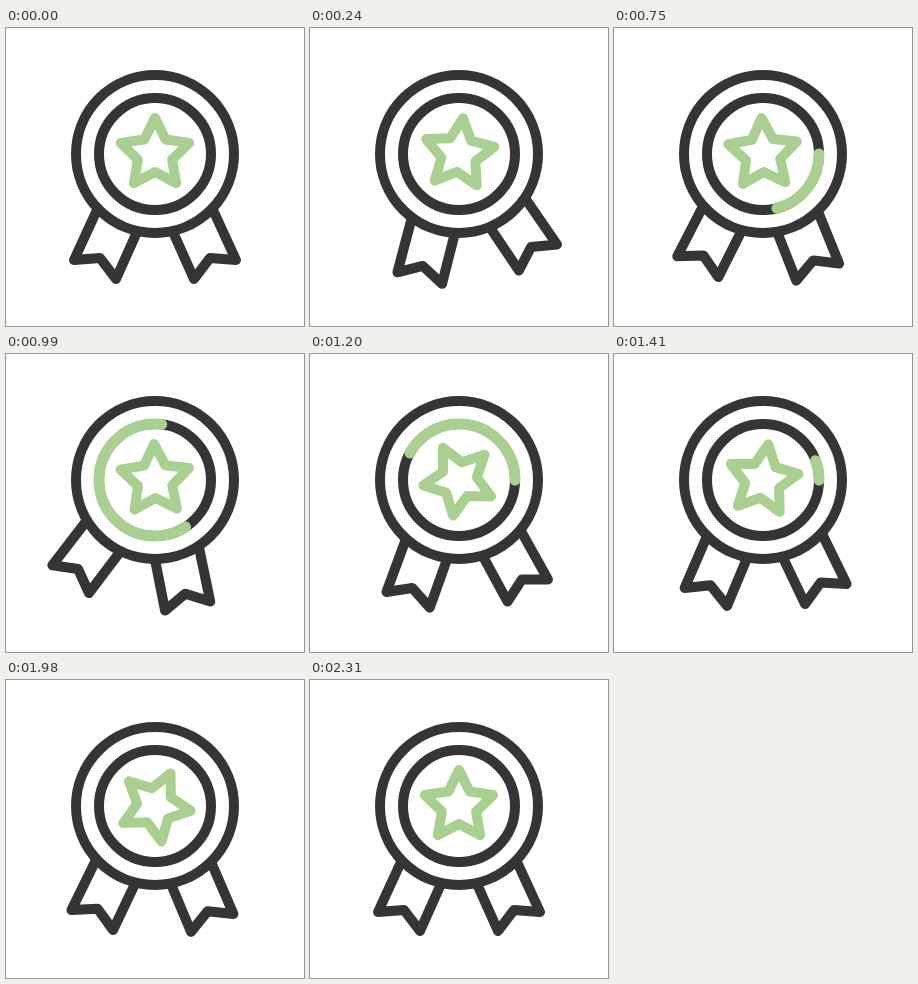
An HTML page for the animation above (2490 ms loop, 298x298 px).

```html
<!DOCTYPE html>
<html lang="en">
<head>
<meta charset="utf-8">
<title>Award rosette</title>
<style>
  html, body { margin: 0; width: 100%; height: 100%; overflow: hidden; background: #fff; }
  svg { display: block; width: 100vw; height: 100vh; }
  g, path, circle { fill: none; stroke-width: 10; stroke-linecap: round; stroke-linejoin: round; }
  .dark { stroke: #353535; }
  .green { stroke: #aad091; }
  #arc { stroke-width: 11; }
</style>
</head>
<body>
<svg viewBox="0 0 298 298">
  <g transform="translate(149 126)">
    <g id="ribbons" class="dark">
      <path d="M58 56L81 106L55 104L39 125L18 78"/>
      <path d="M-58 56L-81 106L-55 104L-39 125L-18 78"/>
    </g>
    <circle class="dark" r="79"/>
    <circle class="dark" r="56"/>
    <circle id="arc" class="green" r="56" pathLength="1"/>
    <path id="star" class="green"/>
  </g>
</svg>
<script>
  const LOOP = 2490, STEP = 30;
  const [ribbons, arc, star] = ['ribbons', 'arc', 'star'].map(id => document.getElementById(id));

  // [time in ms, angle in degrees], eased between neighbours
  const ribbonSwing = [[0, 0], [510, -21.7], [910, 15.8], [1265, -6.4], [1585, 5.2], [2180, 0]];
  const starSwing = [[100, 0], [875, 75], [1905, -51], [2310, 0]];

  const ease = (t, from, to) => {
    const u = Math.min(1, Math.max(0, (t - from) / (to - from)));
    return u * u * (3 - 2 * u);
  };

  const swing = (keys, t) => keys.slice(1).reduce((angle, [time, value], i) =>
    angle + (value - keys[i][1]) * ease(t, keys[i][0], time), keys[0][1]);

  const starPoints = Array.from({ length: 10 }, (_, i) => {
    const r = i % 2 ? 18 : 36, a = (i * 36 - 90) * Math.PI / 180;
    return [r * Math.cos(a), r * Math.sin(a)];
  });
  star.setAttribute('d', `M${starPoints.join('L')}Z`);

  function draw(now) {
    const t = Math.floor(now % LOOP / STEP) * STEP;
    ribbons.setAttribute('transform', `rotate(${swing(ribbonSwing, t)})`);
    star.setAttribute('transform', `rotate(${swing(starSwing, t)})`);

    const head = ease(t, 570, 1180), tail = ease(t, 815, 1510);
    arc.style.visibility = head > tail ? 'visible' : 'hidden';
    arc.setAttribute('stroke-dasharray', `${head - tail} 2`);
    arc.setAttribute('stroke-dashoffset', -tail);
    requestAnimationFrame(draw);
  }
  draw(performance.now());
</script>
</body>
</html>
```
